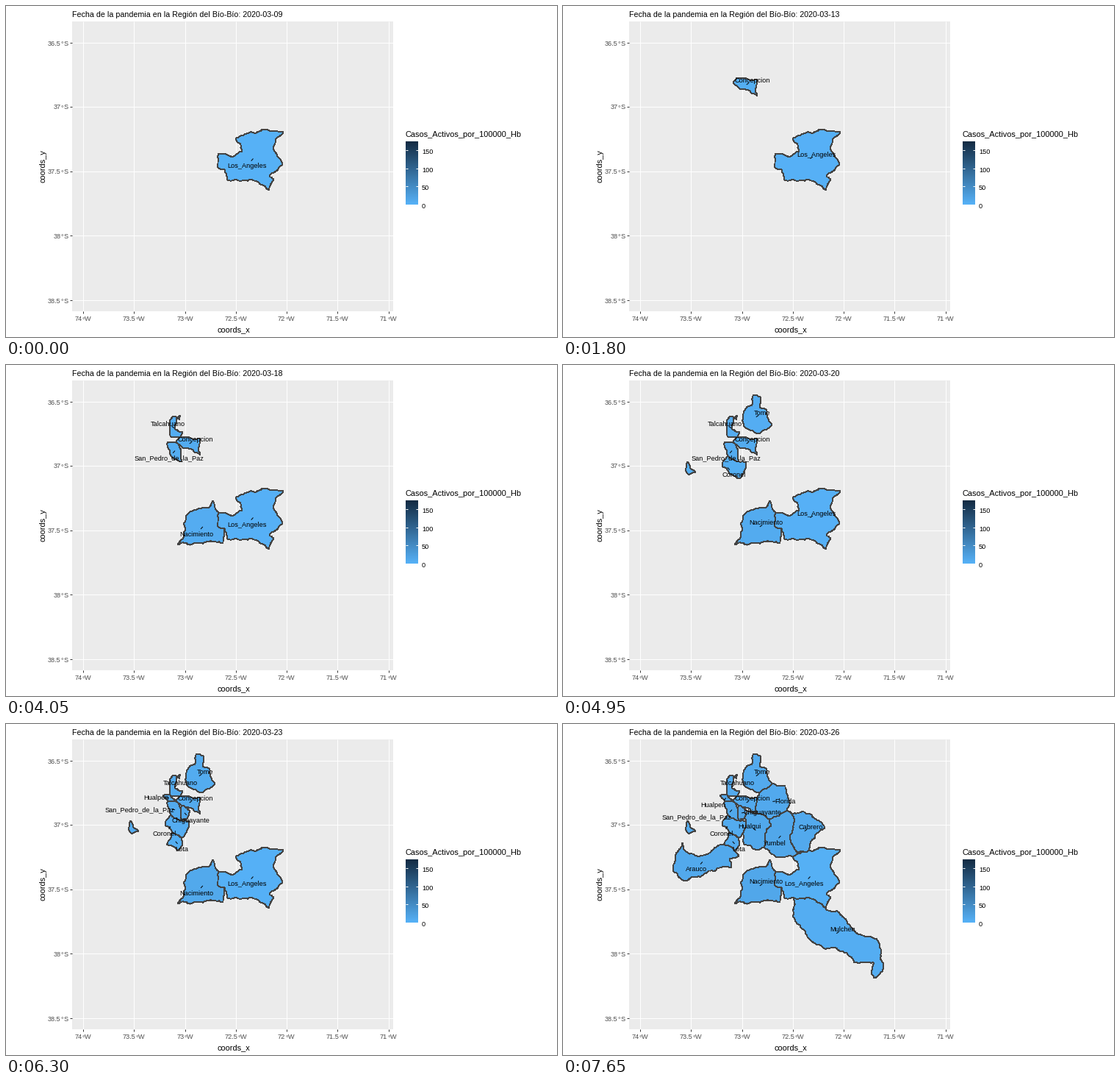
A matplotlib script that plays this animation: 750x450 px, repeating every 8000 ms.

```python
import random
import matplotlib.pyplot as plt
import numpy as np
from matplotlib.animation import FuncAnimation
from matplotlib.patches import Polygon, Rectangle

W, H, DPI = 750, 450, 100
STEP, DAY_MS, LOOP_MS = 50, 450, 8000
DAYS = 18
PX = 72 / DPI
LOW, HIGH = np.array([0x56, 0xB1, 0xF7]) / 255, np.array([0x13, 0x2B, 0x43]) / 255
V_MAX = 175

plt.rcParams["font.family"] = "Liberation Sans"
fig = plt.figure(figsize=(W / DPI, H / DPI), dpi=DPI, facecolor="white")
ax = fig.add_axes([0, 0, 1, 1])
ax.set_xlim(0, W)
ax.set_ylim(H, 0)
ax.axis("off")


def shade(value):
    return LOW + (HIGH - LOW) * value / V_MAX


def text(x, y, s, size=9.1, color="black", **kw):
    return ax.text(x, y, s, fontsize=size * PX, color=color, **kw)


def line(xs, ys, color, z=1):
    # just under one pixel, so that lines snap to a single row or column
    return ax.plot(xs, ys, color=color, lw=0.98 * PX, zorder=z,
                   solid_capstyle="butt")[0]


def box(x, y, w, h, color):
    ax.add_patch(Rectangle((x, y), w, h, fc=color, ec="none", lw=0,
                           antialiased=False, zorder=0))


def degree(x, y, number, letter):
    grey = "#4D4D4D"
    text(x, y, number, color=grey, ha="right")
    text(x + 2, y + 1.7, "°", color=grey, ha="center")
    text(x + 4, y, letter, color=grey)


def wiggle(a, b, rng):
    """Fractal path from a up to, but not including, b."""
    d = b - a
    if np.hypot(*d) < 3:
        return [a]
    mid = (a + b) / 2 + np.array([-d[1], d[0]]) * rng.uniform(-0.15, 0.15)
    return wiggle(a, mid, rng) + wiggle(mid, b, rng)


def outline(flat):
    """Jagged border; neighbours get the same path along a shared edge."""
    pts = list(zip(flat[::2], flat[1::2]))
    out = []
    for a, b in zip(pts, pts[1:] + pts[:1]):
        lo, hi = sorted((a, b))
        rng = random.Random(lo[0] * 7919 + lo[1] * 104729 + hi[0] * 31 + hi[1])
        path = wiggle(np.array(lo), np.array(hi), rng) + [np.array(hi)]
        out += (path if a == lo else path[::-1])[:-1]
    return np.array(out) + 0.5


def centroid(shapes):
    area, moment = 0, np.zeros(2)
    for p in shapes:
        q = np.roll(p, -1, axis=0)
        cross = p[:, 0] * q[:, 1] - q[:, 0] * p[:, 1]
        sign = np.sign(cross.sum())
        area += sign * cross.sum() / 2
        moment += sign * ((p + q) * cross[:, None]).sum(axis=0) / 6
    return moment / area


class Region:
    """A commune; `sides` maps a day to the side of the centre its label takes.

    N/S and E/W shift the label; lower case makes it start or end at the centre.
    """

    def __init__(self, name, peak, sides, *keys):
        self.peak, self.sides, self.start = peak, sides, min(sides)
        shapes = [outline(k) for k in keys]
        self.centre = centroid(shapes)
        self.parts = [ax.add_patch(Polygon(s, closed=True, ec="#444444",
                                           lw=0.9 * PX, antialiased=False, zorder=3))
                      for s in shapes]
        self.label = text(0, 0, name, zorder=6)
        self.lead = line([], [], "black", 5)

    def show(self, day):
        on = day >= self.start
        for art in self.parts + [self.label, self.lead]:
            art.set_visible(on)
        if not on:
            return
        side = self.sides[max(d for d in self.sides if d <= day)]
        x, y = self.centre
        dx = 8.5 if side[-1] in "Ee" else -8.5
        dy = {"N": -6, "S": 9.5}.get(side[0], -1)
        if side[-1].islower():
            self.label.set_ha("right" if dx < 0 else "left")
            self.label.set_position((x + (-0.5 if dx < 0 else 2.5), y + dy + 3.3))
        else:
            self.label.set_ha("center")
            self.label.set_position((x + dx, y + dy + 3.3))
        k = 4.2 / np.hypot(dx, dy)
        self.lead.set_data([x, x + dx * k], [y, y + dy * k])
        growth = (day - self.start + 1) / (DAYS - self.start)
        for part in self.parts:
            part.set_facecolor(shade(self.peak * (0.4 + 0.6 * growth)))


# Panel, grid and axes
box(90, 21, 437, 394, "#EBEBEB")
for i in range(7):
    x = round(104 + 69.3 * i) + 0.5
    line([x, x], [21, 415], "white")
    line([x, x], [415, 418], "#333333")
    degree(x + (2.5 if i % 2 else -1.3), 428.5, f"{74 - i / 2:g}", "W")
for i in range(5):
    y = round(49 + 87.4 * i) + 0.5
    line([90, 527], [y, y], "white")
    line([87, 90], [y, y], "#333333")
    degree(74.6, y + 4, f"{36.5 + i / 2:g}", "S")
text(309.5, 443, "coords_x", 11, ha="center")
text(50.5, 218, "coords_y", 11, ha="center", va="center", rotation=90)
title = text(90, 15, "", 10.6)

# Colour bar
text(544, 178, "Casos_Activos_por_100000_Hb", 10.95)
for y in range(184, 270):
    box(544, y, 17, 1, shade(V_MAX * (269 - y) / 85))
for v in range(0, 200, 50):
    y = round(270 - v * 0.492) - 0.5
    for x in (544, 557.6):
        line([x, x + 3.4], [y, y], "white", 2)
    text(566, y + 5.3, str(v))

regions = [
    Region("Los_Angeles", 1.5, {0: "SW", 4: "NE", 6: "SW", 11: "NE", 14: "SW"},
           [312, 180, 324, 174, 356, 168, 377, 171, 369, 178, 364, 195, 373, 208,
            376, 214, 358, 232, 364, 235, 357, 250, 346, 242, 333, 235, 314, 236,
            301, 236, 297, 222, 288, 219, 289, 200, 307, 205, 321, 197]),
    Region("Concepcion", 10, {4: "NE", 5: "SW", 7: "NE"},
           [231, 104, 236, 97, 264, 99, 262, 111, 264, 122, 250, 113, 238, 110]),
    Region("Talcahuano", 9, {7: "NW", 14: "NE"},
           [226, 70, 230, 69, 229, 86, 240, 91, 237, 98, 223, 96, 222, 90],
           [233, 71, 236, 68, 236, 74]),
    Region("San_Pedro_de_la_Paz", 12, {9: "SW", 12: "w", 17: "Sw"},
           [220, 104, 231, 104, 238, 116, 239, 131, 224, 123]),
    Region("Nacimiento", 13, {9: "SW", 11: "NE", 14: "SW", 17: "NE"},
           [281, 184, 289, 200, 288, 219, 297, 222, 295, 241, 272, 240, 233, 244,
            244, 224, 241, 215, 253, 198, 274, 194]),
    Region("Tome", 9, {10: "NE"},
           [258, 40, 269, 43, 267, 57, 276, 60, 284, 80, 267, 93, 248, 85, 245, 65,
            258, 52]),
    Region("Coronel", 8, {10: "SE", 14: "SW"},
           [224, 123, 239, 131, 249, 131, 245, 147, 238, 154, 226, 147, 217, 138],
           [169, 131, 172, 139, 180, 146, 171, 149, 166, 142]),
    Region("Chiguayante", 14, {12: "SE", 17: "e"},
           [238, 110, 250, 118, 246, 128, 239, 131, 238, 116]),
    Region("Hualpen", 14, {13: "w", 17: "Sw"},
           [213, 97, 223, 96, 231, 104, 220, 104]),
    Region("Lota", 8, {14: "SE"},
           [226, 147, 238, 154, 239, 165, 233, 171, 218, 163]),
    Region("Hualqui", 12, {15: "NW"},
           [250, 118, 264, 122, 281, 129, 283, 138, 274, 150, 273, 167, 262, 171,
            246, 163, 245, 147, 249, 131, 246, 128]),
    Region("Florida", 10, {15: "e"},
           [284, 80, 302, 84, 308, 109, 304, 117, 281, 129, 264, 122, 262, 111,
            264, 99, 267, 93]),
    Region("Yumbel", 13, {16: "SW"},
           [281, 129, 304, 117, 311, 122, 309, 150, 320, 174, 312, 180, 290, 181,
            273, 167, 274, 150, 283, 138]),
    Region("Arauco", 11, {16: "SW"},
           [162, 161, 167, 173, 196, 177, 218, 163, 233, 171, 239, 179, 226, 182,
            229, 195, 198, 199, 164, 213, 149, 199, 153, 175]),
    Region("Cabrero", 10, {17: "NE"},
           [311, 122, 325, 118, 338, 123, 356, 141, 337, 159, 331, 174, 320, 174,
            309, 150]),
    Region("Mulchen", 5, {17: "NE"},
           [314, 236, 333, 235, 346, 242, 357, 250, 383, 264, 392, 276, 426, 291,
            432, 305, 436, 331, 423, 345, 422, 323, 396, 324, 386, 311, 357, 306,
            328, 280, 316, 268]),
]


def update(i):
    day = min(i * STEP // DAY_MS, DAYS - 1)
    title.set_text("Fecha de la pandemia en la Región del Bío-Bío: "
                   f"2020-03-{9 + day:02d}")
    for r in regions:
        r.show(day)


anim = FuncAnimation(fig, update, frames=LOOP_MS // STEP, interval=STEP,
                     init_func=lambda: update(0), repeat=True, repeat_delay=0)
plt.show()
```
